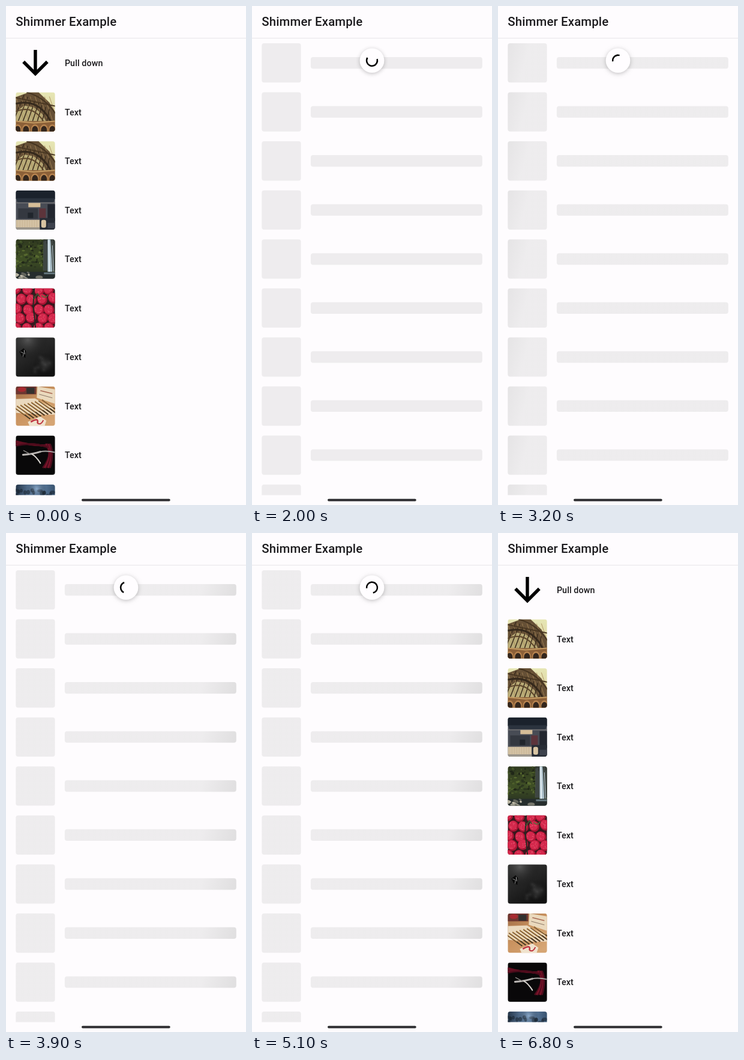
These frames come from a looping animation (400 px wide and 830 px high, 6900 ms). An HTML page with a canvas:

```html
<!DOCTYPE html>
<html lang="en">
<head>
<meta charset="utf-8">
<title>Shimmer Example</title>
<style>
html, body { margin: 0; width: 100%; height: 100%; overflow: hidden; background: #fefcfe; }
#stage { position: relative; width: 400px; height: 830px; overflow: hidden; }
canvas { position: absolute; left: 0; top: 0; }
.txt { position: absolute; white-space: nowrap; color: #1b1a1d; font-family: Roboto, sans-serif; font-weight: 500; }
h1.txt { left: 16.3px; top: 14px; margin: 0; font-size: 20.4px; line-height: 24px; letter-spacing: .15px; }
.row { left: 97.9px; font-size: 14.28px; line-height: 20px; letter-spacing: .1px; }
</style>
</head>
<body>
<div id="stage">
  <canvas width="400" height="830"></canvas>
  <h1 class="txt">Shimmer Example</h1>
  <div id="labels"></div>
</div>
<script>
const LOOP = 6900, STEP = 100;
const PULL = 1450, LOAD = 1660, DONE = 5690, EXIT = 300;
const TOP = 62, PITCH = 81.55, SIZE = 65.3, LEFT = 16.3, ROWS = 10;
const SWEEPS = [2000, 3165, 4362, 5562], SWEEP_MS = 800;
const HALF = 204, TILT = 15 * Math.PI / 180;
const g = document.querySelector('canvas').getContext('2d');
const labels = document.getElementById('labels');

for (let i = 0; i < ROWS - 1; i++) {
  const d = document.createElement('div');
  d.className = 'txt row';
  d.textContent = i ? 'Text' : 'Pull down';
  d.style.top = 85 + i * PITCH + 'px';
  labels.append(d);
}

const clamp = x => Math.min(1, Math.max(0, x));

// cubic-bezier(.4, 0, .2, 1)
function ease(x) {
  x = clamp(x);
  let lo = 0, hi = 1;
  for (let i = 0; i < 24; i++) {
    const m = (lo + hi) / 2, n = 1 - m;
    if (1.2 * n * n * m + .6 * n * m * m + m * m * m < x) lo = m; else hi = m;
  }
  return 3 * lo * lo - 2 * lo * lo * lo;
}

let seed = 1;
function rnd(a = 1, b = 0) {
  seed = (seed * 16807) % 2147483647;
  return b + (a - b) * seed / 2147483647;
}

function rect(c, x, y, w, h) { g.fillStyle = c; g.fillRect(x, y, w, h); }

function oval(c, x, y, rx, ry, rot = 0) {
  g.fillStyle = c;
  g.beginPath();
  g.ellipse(x, y, rx, ry, rot, 0, 7);
  g.fill();
}

function line(c, w, ...p) {
  g.strokeStyle = c;
  g.lineWidth = w;
  g.beginPath();
  g.moveTo(p[0], p[1]);
  for (let i = 2; i < p.length; i += 2) g.lineTo(p[i], p[i + 1]);
  g.stroke();
}

function curve(c, w, x0, y0, x1, y1, x2, y2) {
  g.strokeStyle = c;
  g.lineWidth = w;
  g.beginPath();
  g.moveTo(x0, y0);
  g.quadraticCurveTo(x1, y1, x2, y2);
  g.stroke();
}

function poly(c, ...p) {
  g.fillStyle = c;
  g.beginPath();
  for (let i = 0; i < p.length; i += 2) g.lineTo(p[i], p[i + 1]);
  g.fill();
}

function fade(x0, y0, x1, y1, ...cs) {
  const f = g.createLinearGradient(x0, y0, x1, y1);
  cs.forEach((c, i) => f.addColorStop(i / (cs.length - 1), c));
  rect(f, 0, 0, 66, 66);
}

function glow(c, x, y, r) {
  const f = g.createRadialGradient(x, y, 0, x, y, r);
  f.addColorStop(0, c);
  f.addColorStop(1, 'transparent');
  rect(f, 0, 0, 66, 66);
}

function bridge() {
  fade(0, 0, 0, 66, '#e6e6b4', '#dfd7a6', '#b79a68');
  poly('#665036', 0, 8, 22, 0, 38, 0, 56, 17, 66, 34, 66, 48, 0, 48);
  poly('#b9ac78', 0, 33, 14, 22, 30, 25, 44, 36, 50, 48, 0, 48);
  for (let i = 0; i < 8; i++) {
    line('#3b2d1e', 1.5, i * 8 - 4, 48, i * 6 + 14, 4 + i * 3.4);
    line('#a98a58', .8, i * 8, 7, i * 8 + 13, 46);
  }
  curve('#35291c', 3, 0, 19, 38, 10, 58, 48);
  curve('#463521', 2.2, 18, 0, 48, 8, 66, 35);
  curve('#5c452b', 2, 0, 32, 28, 20, 46, 48);
  line('#493722', 2, 0, 9, 66, 23);
  rect('#8c6038', 0, 48, 66, 18);
  line('#c39a62', 2, 0, 48, 30, 51, 66, 48);
  for (const x of [3, 17, 32, 47, 61]) {
    oval('#b98550', x, 62, 6.6, 8.5);
    oval('#33261d', x, 63, 5, 7);
  }
}

function counter() {
  rect('#484c55', 0, 0, 66, 66);
  rect('#1b222c', 0, 0, 66, 14);
  poly('#2b333e', 0, 13, 66, 13, 62, 21, 4, 21);
  rect('#777678', 0, 20, 66, 1.5);
  rect('#d5bd97', 21, 21, 20, 7);
  rect('#343840', 4, 30, 33, 17);
  rect('#20252c', 20, 37, 9, 9);
  rect('#5c343b', 39, 30, 11, 16);
  rect('#22262f', 53, 23, 13, 28);
  rect('#d4c2a5', 0, 49, 40, 13);
  for (let x = 3; x < 40; x += 4) line('#bda987', .5, x, 49, x, 62);
  rect('#272c35', 40, 46, 26, 20);
  g.fillStyle = '#d8c4a2';
  g.beginPath();
  g.roundRect(42.5, 49, 8, 13, 3);
  g.fill();
  rect('#3d424d', 53, 54, 13, 9);
  rect('#9b968d', 0, 62, 40, 4);
}

function falls() {
  fade(0, 0, 0, 66, '#30391f', '#3f4f25', '#242b20');
  for (let i = 0; i < 110; i++) {
    const c = ['#57692f', '#202718', '#435428', '#2b351f'][i % 4];
    oval(c, rnd(48), rnd(46), rnd(3, 1), rnd(2.2, .7));
  }
  rect('#343a37', 46, 0, 20, 52);
  for (let i = 0; i < 9; i++) line('#4d5652', 1, 47 + i * 2.3, rnd(10), 46 + i * 2.4, 52);
  poly('#a9bdc7', 53, 0, 58, 0, 61, 54, 53, 54);
  line('#e5f0f4', 2, 55, 0, 56, 54);
  line('#b9cbd3', 1, 61, 10, 63, 54);
  rect('#262d2d', 0, 54, 66, 12);
  rect('#65777d', 47, 55, 19, 3);
  for (let i = 0; i < 13; i++)
    oval(['#98978a', '#62645b', '#bdb8a5'][i % 3], rnd(22), rnd(66, 51 + i / 2), rnd(5, 2), rnd(3, 1), .4);
  oval('#77776d', 39, 63, 6, 3);
}

function berries() {
  rect('#39171d', 0, 0, 66, 66);
  for (let r = 0; r < 5; r++) {
    for (let c = 0; c < 4; c++) {
      const x = c * 18 + (r % 2) * 7 + rnd(3), y = r * 16 + rnd(4), a = rnd(.7, -.7);
      oval('#a91534', x, y, 8.5, 9.2, a);
      oval('#d4284c', x - 1, y - 1, 7, 7.6, a);
      for (let k = 0; k < 9; k++) oval('#ef7186', x + rnd(5, -6), y + rnd(5, -6), .6, .6);
    }
  }
  line('#252a22', 2, 31, 0, 29, 28, 33, 66);
  line('#3e5130', 2, 30, 18, 36, 9, 40, 14);
  line('#5a6c3d', 1.5, 43, 12, 49, 15, 54, 11);
}

function smoke() {
  fade(0, 0, 40, 66, '#343434', '#252525', '#111');
  glow('rgba(120,120,120,.55)', 20, 4, 34);
  glow('rgba(90,90,90,.6)', 49, 45, 20);
  for (let i = 0; i < 8; i++) glow('rgba(120,120,120,.18)', rnd(64, 32), rnd(60, 32), 8);
  poly('#0a0a0a', 6, 24, 13, 18, 17, 23, 16, 34, 10, 31);
  line('#8d8d8d', 1, 8, 24, 13, 26, 12, 32);
  line('#b5b5b5', 1, 14, 21, 15, 28);
}

function brushes() {
  fade(0, 0, 50, 66, '#9b6844', '#c9925f', '#d6a574');
  rect('#6d3631', 0, 0, 34, 13);
  oval('#a52a30', 10, 5, 7, 4);
  rect('#32302e', 18, 2, 13, 10);
  poly('#ead9bd', 36, 0, 66, 5, 66, 29, 35, 19);
  line('#a86954', 1.5, 41, 7, 61, 12);
  line('#897565', 1, 39, 13, 61, 19);
  poly('#ead9bf', 0, 21, 32, 20, 62, 36, 66, 47, 47, 47, 0, 44);
  for (let i = 0; i < 9; i++) {
    const x = i * 6 - 4, y = 34 - i * 1.5;
    line('#76522f', 2, x, y, x + 28, y + 20);
    line('#e2bd77', 1, x, y - 1, x + 27, y + 18);
    line('#433626', 1.6, x + 19, y + 13, x + 28, y + 20);
  }
  poly('#efe2cd', 20, 59, 41, 50, 51, 57, 48, 66, 23, 66);
  curve('#bf3541', 2.5, 25, 59, 39, 51, 36, 61);
  curve('#bf3541', 2, 36, 61, 42, 65, 46, 56);
}

function branch() {
  rect('#090809', 0, 0, 66, 66);
  for (let i = 0; i < 5; i++) {
    curve(i % 2 ? '#751327' : '#4b0b1b', 3, 0, 9 + i * 2, 28, 18 - i * 2, 54, 16 + i);
    curve(i % 2 ? '#7c142a' : '#4e0d1d', 3, 49 + i * 2, 14, 64, 30, 45 + i * 3, 54);
  }
  g.lineCap = 'round';
  curve('#bdb9b6', 3, 12, 32, 29, 31, 41, 27);
  curve('#aaa7a5', 2, 40, 27, 52, 25, 65, 28);
  curve('#d8d4cf', 2, 27, 31, 34, 35, 41, 46);
  line('#8d8a88', 1.2, 24, 31, 13, 25);
  g.lineCap = 'butt';
}

function lake() {
  fade(0, 0, 66, 0, '#243448', '#6d8fb5', '#37516d');
  for (let i = 0; i < 18; i++) oval('rgba(25,36,47,.55)', rnd(66), rnd(22, 9), rnd(5, 2), rnd(4, 2));
  glow('rgba(165,193,222,.55)', 35, 7, 16);
}

const photos = [bridge, bridge, counter, falls, berries, smoke, brushes, branch, lake];
const arrow = new Path2D('M20 12l-1.41-1.41L13 16.17V4h-2v12.17l-5.58-5.59L4 12l8 8 8-8z');

function content() {
  g.save();
  g.translate(LEFT, TOP);
  g.scale(SIZE / 24, SIZE / 24);
  g.fillStyle = '#000';
  g.fill(arrow);
  g.restore();
  photos.forEach((draw, i) => {
    g.save();
    g.translate(LEFT, TOP + (i + 1) * PITCH);
    g.beginPath();
    g.roundRect(0, 0, SIZE, SIZE, 4);
    g.clip();
    seed = 71 + i * 13;
    draw();
    g.restore();
  });
}

function shade(t, mid) {
  const gray = a => `rgba(189,189,189,${a})`;
  const start = SWEEPS.filter(s => s <= t).pop();
  const u = start === undefined ? 0 : (t - start) / SWEEP_MS;
  if (u <= 0 || u >= 1) return gray(.25);
  const s = (u * 2 - 1) * 388, cx = Math.cos(TILT), cy = Math.sin(TILT);
  const at = d => [200 + d * cx, mid + d * cy];
  const f = g.createLinearGradient(...at(s - HALF), ...at(s + HALF));
  f.addColorStop(0, gray(.25));
  f.addColorStop(.5, gray(1));
  f.addColorStop(1, gray(.25));
  return f;
}

function skeleton(t) {
  for (let i = 0; i < ROWS; i++) {
    const y = TOP + i * PITCH;
    g.fillStyle = shade(t, y + SIZE / 2);
    g.beginPath();
    g.roundRect(LEFT, y, SIZE, SIZE, 4);
    g.roundRect(97.9, y + 23, 285.9, 19.2, 4);
    g.fill();
  }
}

function spinner(t) {
  if (t < PULL || t > DONE + EXIT) return;
  const pull = clamp((t - PULL) / (LOAD - PULL));
  const shown = Math.min(pull, 1 - ease((t - DONE) / EXIT));
  const y = 33 + 57.7 * shown;
  g.save();
  g.shadowColor = 'rgba(0,0,0,.24)';
  g.shadowBlur = 7;
  g.shadowOffsetY = 1.5;
  oval('#fffdff', 200, y, 20.4, 20.4);
  g.restore();

  let from, sweep;
  if (t < LOAD) {
    from = -90 + 60 * pull;
    sweep = 230 * pull;
  } else {
    const e = t - LOAD, n = Math.floor(e / 1332), p = e % 1332;
    const head = 290 * ease(p / 666), tail = 290 * ease((p - 666) / 666);
    from = -90 + 216 * n + 286 * p / 1332 + tail;
    sweep = head - tail;
  }
  g.strokeStyle = '#000';
  g.lineWidth = 2.55;
  g.beginPath();
  g.arc(200, y, 8.95, from * Math.PI / 180, (from + sweep) * Math.PI / 180);
  g.stroke();
}

function draw(t) {
  const loading = t >= LOAD && t < DONE;
  labels.style.display = loading ? 'none' : '';
  rect('#fefcfe', 0, 0, 400, 830);
  rect('#e8e5e9', 0, 53, 400, 1);
  g.save();
  g.beginPath();
  g.rect(0, 54, 400, 759.5);
  g.clip();
  if (loading) skeleton(t); else content();
  spinner(t);
  g.restore();
  g.fillStyle = '#303033';
  g.beginPath();
  g.roundRect(126, 819.8, 147.7, 4, 2);
  g.fill();
}

const begin = performance.now();
let last = -1;
function tick() {
  const t = Math.floor((performance.now() - begin) % LOOP / STEP) * STEP;
  if (t !== last) draw(last = t);
  requestAnimationFrame(tick);
}
tick();
</script>
</body>
</html>
```
